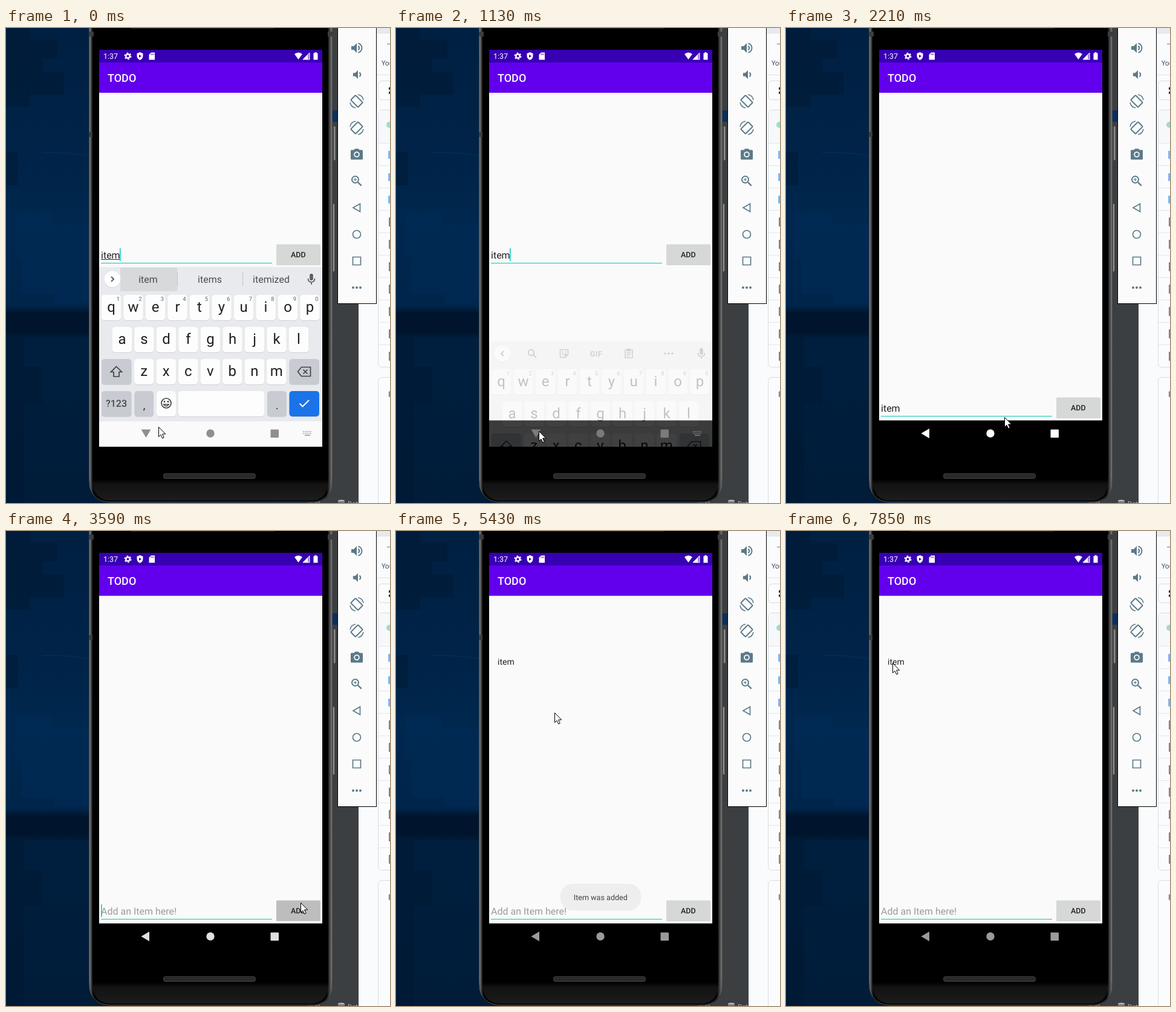
An HTML page for the animation above (8000 ms loop, 635 px wide and 785 px high).

```html
<!DOCTYPE html>
<html lang="en">
<head>
<meta charset="utf-8">
<title>Todo app</title>
<style>
  html, body { margin: 0; width: 100%; height: 100%; overflow: hidden; background: #001d3b; }
  svg { display: block; width: 635px; height: 785px; }
  text { font-family: Roboto, "Open Sans", sans-serif; text-rendering: geometricPrecision; }
  .mid { text-anchor: middle; }
  .med { font-weight: 500; }
  .web { font-family: "Open Sans", sans-serif; }
  .line { fill: none; stroke: currentColor; stroke-width: 2; }
</style>
</head>
<body>
<svg viewBox="0 0 635 785">
  <defs>
    <linearGradient id="wall" x2="0" y2="1">
      <stop offset="0" stop-color="#002042"/>
      <stop offset=".25" stop-color="#002347"/>
      <stop offset=".4" stop-color="#00274e"/>
      <stop offset=".585" stop-color="#00254b"/>
      <stop offset=".6" stop-color="#00152d"/>
      <stop offset=".64" stop-color="#00152d"/>
      <stop offset=".655" stop-color="#001f3f"/>
      <stop offset="1" stop-color="#001c39"/>
    </linearGradient>
    <linearGradient id="rim" gradientUnits="userSpaceOnUse" x1="137" x2="540">
      <stop offset="0" stop-color="#3a3a3a"/>
      <stop offset=".004" stop-color="#757575"/>
      <stop offset=".009" stop-color="#4a4a4a"/>
      <stop offset=".014" stop-color="#1c1c1c"/>
      <stop offset=".02" stop-color="#060606"/>
      <stop offset=".976" stop-color="#060606"/>
      <stop offset=".984" stop-color="#2a2a2a"/>
      <stop offset=".99" stop-color="#4a4a4a"/>
      <stop offset=".996" stop-color="#757575"/>
      <stop offset="1" stop-color="#3a3a3a"/>
    </linearGradient>
    <linearGradient id="chin" x2="0" y2="1">
      <stop offset="0" stop-color="#000"/>
      <stop offset=".955" stop-color="#000"/>
      <stop offset=".965" stop-color="#121212"/>
      <stop offset="1" stop-color="#1c1c1c"/>
    </linearGradient>
    <pattern id="mesh" width="3" height="3" patternUnits="userSpaceOnUse">
      <rect width="3" height="3" fill="#222"/><circle cx="1.5" cy="1.5" r=".8" fill="#454545"/>
    </pattern>
    <clipPath id="screen"><rect x="154" y="36" width="369" height="656"/></clipPath>
    <clipPath id="ide"><rect x="500" y="770" width="83" height="15"/></clipPath>
  </defs>

  <rect width="635" height="785" fill="url(#wall)"/>
  <path d="M0 0H40V20H85V50H60V72H95V110H40V130H0ZM0 205H20V260H0ZM0 510H30V560H60V620H30V785H0Z" fill="#001833" opacity=".5"/>
  <path d="M15 305H75V325H137V455H80V440H25V380H15Z" fill="#002c58" opacity=".5"/>
  <path d="M60 206Q100 205 137 211" fill="none" stroke="#003262" stroke-width="2" opacity=".6"/>

  <rect x="500" width="83" height="785" fill="#3c3f41"/>
  <rect x="538" y="136" width="11" height="19" fill="#0b2f5c"/>
  <g clip-path="url(#ide)" font-size="11" fill="#b0b4b6">
    <text x="510" y="790">ol</text><text x="565" y="790">Dat</text>
    <path d="M549 781h11v2h-11zM549 784h11v2h-11z" fill="#9a9da0"/><ellipse cx="554.500" cy="781" rx="5" ry="1.500"/>
  </g>

  <g id="page"></g>
  <g id="phone">
    <g fill="#4c4c4c"><path d="M540 162h5v57h-5zM540 290h3.500v113h-3.500z"/></g>
    <path d="M543.500 163V218M542 291V402" stroke="#a8a8a8" stroke-width="1.500"/>
    <path d="M137 0H540V744Q540 784 506 784H171Q137 784 137 744Z" fill="url(#rim)"/>
    <path d="M143 0H533V744Q533 781 503 781H174Q143 781 143 744Z" fill="url(#chin)"/>
    <path d="M138 744Q138 783.500 172 783.500H505Q539 783.500 539 744" fill="none" stroke="#555"/>
    <path d="M137 6h8v8h-8zM137 172h6v8h-6zM532 6h8v8h-8z" fill="#3d3d3d"/>
    <rect x="205" y="-4" width="239" height="5" rx="2" fill="#292929"/>
    <rect x="260.500" y="736.500" width="152" height="8" rx="3" fill="url(#mesh)" stroke="#444"/>
  </g>

  <g clip-path="url(#screen)">
    <rect x="154" y="36" width="369" height="613" fill="#fafafa"/>
    <rect x="154" y="107" width="369" height="2" fill="#eeecf1"/>
    <rect x="154" y="36" width="369" height="21" fill="#3700b3"/>
    <rect x="154" y="57" width="369" height="50" fill="#6200ee"/>
    <g fill="#fff">
      <text x="161" y="51" font-size="12.500">1:37</text>
      <g fill="none" stroke="#fff"><circle cx="201.500" cy="46.500" r="3.200" stroke-width="2.400"/><circle cx="201.500" cy="46.500" r="5" stroke-width="2" stroke-dasharray="2.600 2.640"/></g>
      <path d="M221.500 40l5 2v4q0 5-5 7q-5-2-5-7v-4z"/><path d="M220 44l4 2.500l-4 2.500z" fill="#3700b3"/>
      <path d="M240 40.500h6v12h-9.500v-8.500z"/><path d="M240 42.500v2M242 42.500v2M244 42.500v2" stroke="#3700b3"/>
      <path d="M477 43q6.500-5 13 0l-6.500 9z"/>
      <path d="M502 41v11h-11z" opacity=".5"/><path d="M499 44v8h-8z"/><path d="M502 41v11h-11z" fill="none" stroke="#fff"/>
      <path d="M510.500 40h3v1.500h2v11h-7v-11h2z"/>
      <text x="168" y="89" font-size="18" class="med">TODO</text>
    </g>
    <text id="entry" x="168" y="220.500" font-size="14" fill="#222">item</text>
    <rect x="154" y="648.500" width="369" height="44" fill="#000"/>

    <g id="row">
      <text id="typed" x="157" y="381" font-size="16" fill="#222">item</text>
      <path id="under" d="M157 382.500H188" stroke="#222"/>
      <text id="hint" x="157" y="381" font-size="16" fill="#9b9b9b">Add an Item here!</text>
      <rect x="157" y="388" width="283" height="1.200" fill="#2accbd"/>
      <rect id="caret" y="364" width="1.600" height="21" fill="#10cdbb"/>
      <rect x="447" y="358.500" width="73" height="33.500" rx="1.500" fill="#c4c5c5" opacity=".7"/>
      <rect id="btn" x="447" y="357.500" width="72.500" height="33.500" rx="1.500"/>
      <text x="483.300" y="379" font-size="12.500" class="mid med" fill="#222">ADD</text>
    </g>

    <g id="toast">
      <rect x="272" y="583" width="133" height="44" rx="20" fill="#eee"/>
      <text x="338.300" y="610" font-size="12.600" class="mid" fill="#444">Item was added</text>
    </g>
    <g id="kb"></g>
    <g id="icons">
      <path id="down" d="M223.500 663.500H239.500L231.500 677Z"/>
      <path id="back" d="M223.500 670L237 662V678Z"/>
      <circle cx="338" cy="670" r="6.700"/>
      <rect x="437.500" y="663.500" width="13.500" height="13.500" rx="1"/>
      <g id="switch" stroke="#8f8f8f" stroke-width="1.400">
        <path d="M491 667H505M491 670H505" stroke-dasharray="1.500 1.500"/><path d="M494 673H503"/>
      </g>
    </g>
  </g>

  <g id="panel" color="#5c7a89"></g>
  <path id="mouse" d="M.5.5V16.500L4 13.200L6.700 19L9.200 17.900L6.600 12H11.700Z" fill="#fff" stroke="#000"/>
</svg>

<script>
const $ = id => document.getElementById(id);
const box = (x, y, w, h, fill, rx = 0) =>
  `<rect x="${x}" y="${y}" width="${w}" height="${h}" rx="${rx}" fill="${fill}"/>`;
const label = (s, x, y, size, fill = '#222', cls = 'mid') =>
  `<text x="${x}" y="${y}" font-size="${size}" fill="${fill}" class="${cls}">${s}</text>`;
const icon = (x, y, body) => `<g transform="translate(${x} ${y})">${body}</g>`;
const stroke = (d, width = 2) => `<path class="line" d="${d}" style="stroke-width:${width}"/>`;
const dot = (x, y, r) => `<circle cx="${x}" cy="${y}" r="${r}" fill="currentColor"/>`;

// Browser page behind the emulator
function page() {
  let s = box(583, 455, 52, 330, '#fafbfc') + box(613, 0, 22, 785, '#fafbfc') + box(613, 0, 22, 8, '#e7e9ee');
  s += '<path d="M613 8.500H635M613 77.500H635" stroke="#dfe2e6"/><path d="M630 26.500H635" stroke="#777"/>';
  s += label('You', 621, 62, 11.5, '#24405f', 'web');
  for (const [y, h] of [[87.5, 31], [135.5, 425], [577.5, 230]])
    s += `<rect x="615.500" y="${y}" width="60" height="${h}" rx="6" fill="#fbfcfd" stroke="#d8dce1"/>`;
  s += '<path d="M616 141Q616 136 621 136H635V190H616Z" fill="#f6f8fa"/>';
  s += box(633, 98, 2, 4, '#333') + box(633, 105, 2, 4, '#333');
  s += '<circle cx="634" cy="160" r="5" fill="#9fdccb"/>';
  for (let i = 0; i < 10; i++) {
    const y = 190 + i * 37;
    s += box(616, y, 19, 1, '#e3e6ea');
    s += i < 3 ? box(632, y + 13, 5, 13, '#79b8ff', 1)
               : `<rect x="634" y="${y + 13}" width="6" height="13" fill="none" stroke="#4c545c" stroke-width="1.400"/>`;
  }
  return s + label('F', 632, 610, 13, '#16406b', 'web');
}

// Emulator tool column, one button every 44 px
function panel() {
  const cone = '<path d="M-9-3h4l5-5V8l-5-5h-4z" fill="currentColor"/>';
  const turn = '<rect class="line" x="-5.500" y="-8.500" width="11" height="17" rx="1" transform="rotate(-45)"/>' +
    stroke('M2-11A11 11 0 0 1 11-2M-2 11A11 11 0 0 1-11 2', 1.5);
  const tools = [
    cone + stroke('M2.500-3.500Q6 0 2.500 3.500M2.500-7.500A7.700 7.700 0 0 1 2.500 7.500'),
    `<g transform="translate(2 0) scale(.9)">${cone}</g>` + stroke('M4.500-3.500Q8 0 4.500 3.500'),
    turn,
    `<g transform="scale(-1 1)">${turn}</g>`,
    '<path d="M-10-6q0-1.500 1.500-1.500h4l1.500-2h6l1.500 2h4q1.500 0 1.500 1.500V7q0 1.500-1.500 1.500h-17Q-10 8.500-10 7z" fill="currentColor"/>' +
      '<circle r="3.900" fill="none" stroke="#fbfbfb" stroke-width="1.800"/>',
    '<circle class="line" cx="-2.500" cy="-2.500" r="5.500"/>' + stroke('M2 2L7.700 7.700', 2.4) + stroke('M-5-2.500h5M-2.500-5v5', 1.2),
    stroke('M-6 0L5.500-6.500V6.500Z', 1.7),
    '<circle class="line" r="6.500" style="stroke-width:1.700"/>',
    stroke('M-6.500-6.500H6.500V6.500H-6.500Z', 1.7),
    [-6, 0, 6].map(x => dot(x, 0, 2)).join('')
  ];
  return '<rect x="548.500" y="-2" width="64" height="457.500" fill="#fbfbfb" stroke="#000"/>' +
    tools.map((t, i) => icon(580, 33 + 44 * i, t)).join('');
}

function keyboard() {
  const grey = '#c8cbd1', ink = '#1f1f1f', soft = '#5a5d61', word = '#4a4c4f';
  const key = (x, y, w, fill = '#fdfdfd') => box(x, y + 1, w, 42, '#cfd2d6', 5) + box(x, y, w, 42, fill, 5);
  let s = box(154, 395, 369, 255, '#e8eaed') + box(154, 650, 369, 42, '#fafafa');

  s += '<g id="words">' + box(189, 396, 94.5, 39, '#d7d9db') +
    '<path d="M283.500 404V426M391.500 404V426" stroke="#c0c3c6"/>' +
    label('item', 235, 421, 16, word) + label('items', 337, 421, 16, word) + label('itemized', 438.5, 421, 16, word) + '</g>';
  s += `<g id="tools" color="${soft}">` +
    icon(225, 415, '<circle class="line" cx="-1.500" cy="-1.500" r="4.700"/>' + stroke('M2 2L7 7')) +
    icon(278, 415, stroke('M-6.500-6.500H6.500V2L2 6.500H-6.500ZM6.500 2H2V6.500M-3.500 0Q0 4 3.500 0', 1.6) + dot(-2.5, -2.5, 1.2) + dot(2.5, -2.5, 1.2)) +
    `<text x="331" y="419.500" font-size="12.500" font-weight="700" class="mid" fill="${soft}" letter-spacing=".5">GIF</text>` +
    icon(385, 415, stroke('M-6-6H6V7H-6ZM-3.500-2H3.500M-3.500 1H3.500M-3.500 4H1', 1.6) + box(-3, -8, 6, 4, soft)) +
    [445, 451, 457].map(x => dot(x, 415, 1.8)).join('') + '</g>';
  s += '<circle cx="176" cy="416" r="13.500" fill="#d5d7da"/><circle cx="176" cy="415" r="13.300" fill="#fff"/>' +
    icon(176, 415, `<g id="chev" color="${soft}">` + stroke('M-2-4L2 0L-2 4') + '</g>');
  s += icon(505, 415, `<g color="${soft}">` + box(-2.8, -9, 5.6, 11, soft, 2.8) + stroke('M-5.500-1Q-5.500 5 0 5Q5.500 5 5.500-1M0 5V9', 1.7) + '</g>');

  ['qwertyuiop', 'asdfghjkl', 'zxcvbnm'].forEach((row, r) => {
    const x0 = [174, 192, 228.3][r], y = 441 + 53 * r;
    [...row].forEach((c, i) => {
      const x = x0 + 36.5 * i;
      s += key(x - 16.2, y, 32.4) + label(c, x, y + 28, 24, ink);
      if (!r) s += label((i + 1) % 10, x + 11.5, y + 10, 9.5, '#5f6368');
    });
  });

  s += key(158, 547, 49.5, grey) + key(468.5, 547, 49.5, grey) + key(158, 600, 49.5, grey) + key(212.5, 600, 31.5, grey) +
    key(249, 600, 32) + key(285, 600, 142) + key(432, 600, 32, grey) + key(468.5, 600, 49.5, '#1a73e8');
  s += '<g color="#3f4246">' +
    icon(182.5, 568, stroke('M0-8.500L9 .5H4.500V8H-4.500V.5H-9Z', 1.7)) +
    icon(493, 568, stroke('M-10.500 0L-4.500-7.500H10.500V7.500H-4.500ZM-1.500-3.500L5.500 3.500M5.500-3.500L-1.500 3.500', 1.7)) +
    icon(265, 620, '<circle class="line" r="8" style="stroke-width:1.700"/>' + stroke('M-4.500 2Q0 7.500 4.500 2Z', 1.3) + dot(-3, -2.5, 1.4) + dot(3, -2.5, 1.4)) + '</g>';
  s += icon(493, 620, '<g color="#fff">' + stroke('M-7.500 .5L-2.500 5.500L8-5') + '</g>');
  return s + label('?123', 182.5, 626, 16, '#46494d', 'mid med') + label(',', 228.5, 630, 18, ink) + label('.', 448, 630, 18, ink);
}

$('page').innerHTML = page();
$('panel').innerHTML = panel();
$('kb').innerHTML = keyboard();

// Each step: [start ms, ...values], held until the next one
const mouse = [
  [0, 252, 659], [290, 250, 660], [430, 244, 662], [570, 239, 665], [710, 236, 666],
  [1790, 244, 664], [1930, 268, 660], [2070, 312, 652], [2210, 361, 643], [2350, 425, 633], [2490, 490, 623], [2770, 529, 617],
  [2910, 519, 615], [3040, 505, 614], [3170, 494, 614], [3300, 487, 614],
  [4840, 480, 606], [4980, 450, 560], [5120, 395, 470], [5260, 330, 380], [5400, 262, 300], [5540, 212, 250], [5680, 186, 228], [5820, 178, 220],
  [5970, 177, 219], [6120, 176, 218]
];
const navGrey = [[0, 143], [1130, 123], [1260, 204], [1390, 235], [1520, 255], [3040, 242], [3300, 224],
  [4130, 205], [4270, 186], [4400, 170], [4530, 154]];
const toast = [[0, 0], [3720, .4], [3850, .85], [4130, 1], [5540, .6], [5680, .25], [5820, 0]];
const button = [[0, '#d6d7d7'], [3590, '#bcbdbd'], [3720, '#cacbcb'], [3850, '#d6d7d7']];
const blink = [0, 570, 990, 1790, 2350, 2910, 3300, 4130, 4530, 5120, 5540, 6120, 6560, 7020, 7450, 7850];
const at = (steps, t) => steps.filter(s => s[0] <= t).pop().slice(1);
const show = (id, on) => $(id).style.display = on ? '' : 'none';
const set = (id, name, v) => $(id).setAttribute(name, v);

function draw(t) {
  const closing = t >= 990, sliding = t >= 1130, closed = t >= 1260, cleared = t >= 3590;
  set('mouse', 'transform', `translate(${at(mouse, t)})`);

  show('kb', !closed);
  set('kb', 'opacity', sliding ? .25 : 1);
  set('kb', 'transform', `translate(0 ${sliding ? 123 : 0})`);
  set('chev', 'transform', `scale(${closing ? -1 : 1} 1)`);
  show('words', !closing);
  show('tools', closing);
  show('under', !closing);

  const g = at(navGrey, t)[0];
  set('icons', 'fill', `rgb(${g},${g},${g})`);
  show('down', !closed);
  show('back', closed);
  show('switch', !closed);

  set('row', 'transform', `translate(0 ${closed ? 253 : 0})`);
  show('typed', !cleared);
  show('hint', cleared);
  set('caret', 'x', cleared ? 157 : 188);
  show('caret', blink.filter(b => b <= t).length % 2);
  set('btn', 'fill', at(button, t)[0]);
  show('entry', t >= 3720);
  set('toast', 'opacity', at(toast, t)[0]);
}

function tick() {
  draw(performance.now() % 8000);
  requestAnimationFrame(tick);
}
tick();
</script>
</body>
</html>
```
